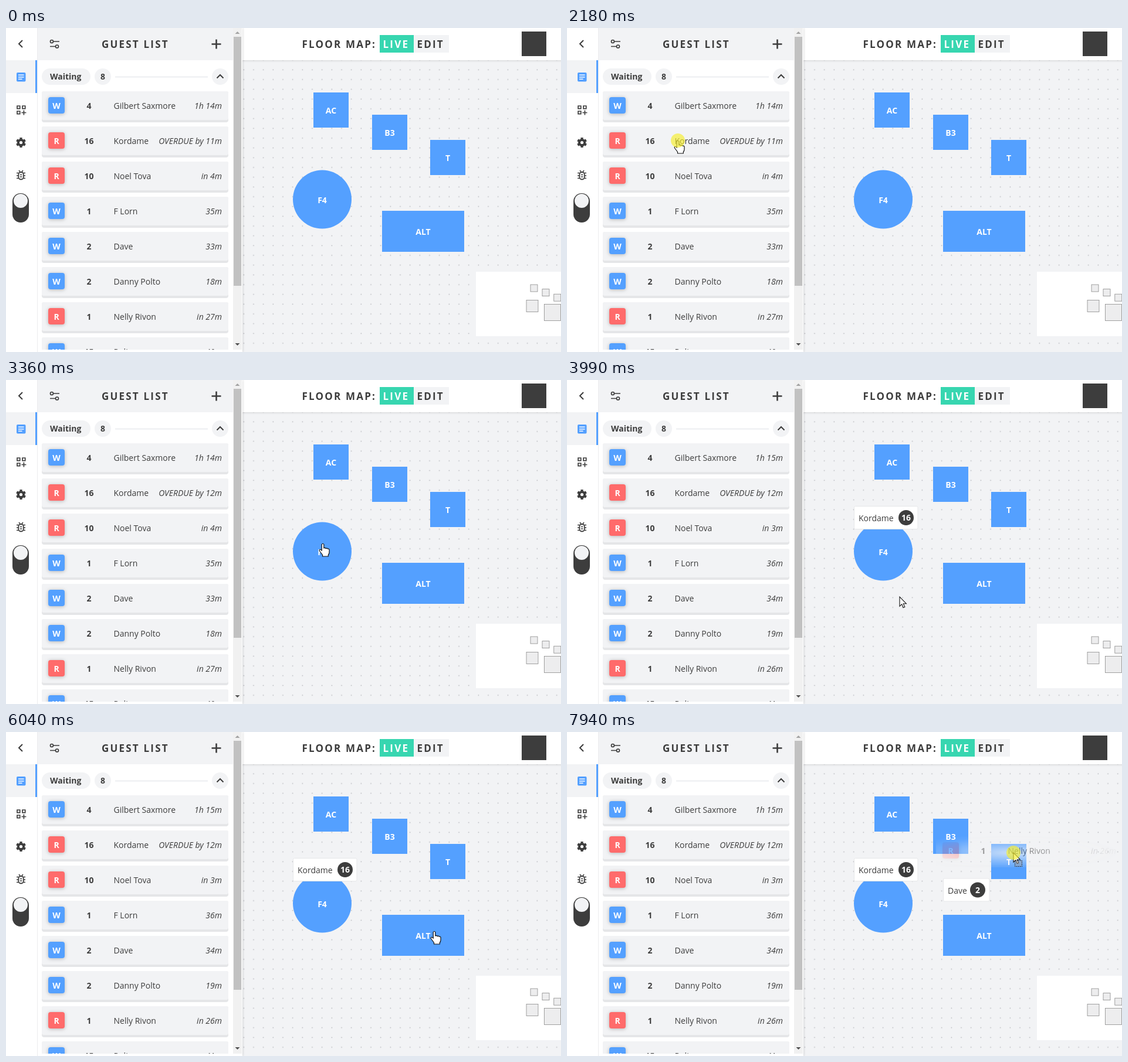
An HTML page for the animation above (8 s loop, 946 by 553 pixels).

```html
<!DOCTYPE html>
<html lang="en">
<head>
<meta charset="utf-8">
<title>Guest list</title>
<style>
  html, body { margin: 0; width: 100%; height: 100%; overflow: hidden; background: #fff; }
  svg { display: block; width: 946px; height: 553px; font: 14px "Open Sans", "Noto Sans", sans-serif; }
  text { fill: #3d3d3d; white-space: pre; }
  .b { font-weight: 700; }
  .i { font-style: italic; text-anchor: end; }
  .m { text-anchor: middle; }
  .w { fill: #fff; }
  .head { font-size: 17px; font-weight: 700; letter-spacing: 2.2px; }
  .line { fill: none; stroke: #3d3d3d; stroke-width: 2; }
  .thin { stroke-width: 1.7; }
  .badge { filter: drop-shadow(0 1px 3px rgba(0, 0, 0, .25)); }
  .shade { filter: drop-shadow(0 0 2px rgba(0, 0, 0, .2)); }
</style>
</head>
<body>
<svg viewBox="0 0 946 553">
  <defs>
    <pattern id="dots" x="397" y="63" width="16.67" height="16.67" patternUnits="userSpaceOnUse">
      <circle cx="8.3" cy="8.3" r=".85" fill="#b4b5ba"/>
    </pattern>
    <clipPath id="list"><rect x="54" y="55" width="333" height="494"/></clipPath>
  </defs>

  <!-- floor map -->
  <rect x="403" y="55" width="543" height="498" fill="#f2f3f5"/>
  <rect x="403" y="55" width="543" height="498" fill="url(#dots)"/>
  <g id="tables"></g>
  <rect x="801" y="416" width="145" height="110" fill="#fff"/>
  <g id="mini" fill="#ededee" stroke="#8a8a8a" stroke-width=".8"></g>
  <g id="seats"></g>
  <rect class="shade" x="402" width="550" height="55" fill="#fff"/>
  <text class="head" x="504.5" y="34">FLOOR MAP:</text>
  <rect x="637" y="12" width="58" height="30" fill="#37d6b0"/>
  <rect x="695" y="12" width="60" height="30" fill="#f2f3f5"/>
  <text class="head w" x="642.5" y="34">LIVE</text>
  <text class="head" x="700.5" y="34">EDIT</text>
  <rect x="879" y="6" width="42" height="42" fill="#3d3d3d"/>

  <!-- side bar -->
  <rect class="shade" width="403" height="553" fill="#fff"/>
  <rect x="53" width="1" height="553" fill="#ececee"/>
  <path class="line" d="M28 21l-6 6 6 6"/>
  <rect y="55" width="50" height="56" fill="#f2f3f5"/>
  <rect x="50" y="55" width="3" height="56" fill="#54a0ff"/>
  <rect x="18" y="76" width="15.5" height="15.5" rx="2" fill="#54a0ff"/>
  <path stroke="#fff" stroke-width="1.6" d="M21 80.3h9.500M21 83.800h9.500M21 87.300h6.500"/>
  <path class="line thin" d="M19 133h4.700v4.700H19zM28 133h4.700v4.700H28zM19 142h4.700v4.700H19zM30.400 140.500v8M26.400 144.500h8"/>
  <g fill="none" stroke="#3d3d3d">
    <circle cx="25.5" cy="195.5" r="4.6" stroke-width="4"/>
    <circle cx="25.5" cy="195.5" r="7" stroke-width="3" pathLength="12" stroke-dasharray="1.1 .9" stroke-dashoffset="1.55"/>
    <rect x="21.3" y="246" width="8.5" height="12.5" rx="4.2" stroke-width="1.8"/>
    <path stroke-width="1.6" d="M18 247.500h3.500M18 252h3M18 256.500h3.500M29.500 247.500H33M30 252h3M29.500 256.500H33M22 243l2 2.500M29 243l-2 2.500M23.800 250.500h3.500M23.800 254h3.500"/>
  </g>
  <rect x="11" y="282" width="28" height="50" rx="14" fill="#3d3d3d"/>
  <circle cx="25" cy="295" r="12" fill="#f2f3f5"/>

  <!-- guest list -->
  <rect x="54" width="333" height="55" fill="#f2f3f5"/>
  <path class="line thin" d="M80.500 23H91M75 31.500h9"/>
  <circle class="line thin" cx="78" cy="23" r="2.5"/>
  <circle class="line thin" cx="87" cy="31.5" r="2.5"/>
  <text class="head" x="163" y="34">GUEST LIST</text>
  <path stroke="#3d3d3d" stroke-width="2.6" d="M350.500 27.500h16M358.500 19.500v16"/>
  <g fill="#f2f3f5">
    <rect x="61" y="69" width="83" height="28" rx="14"/>
    <circle cx="165" cy="83" r="14"/>
    <rect x="186" y="82" width="158" height="3"/>
    <circle cx="365" cy="83" r="14"/>
  </g>
  <text class="b" x="75" y="88">Waiting</text>
  <text class="b m" x="165" y="88">8</text>
  <path class="line" d="M359.500 85.500l5.500-5.500 5.500 5.500"/>
  <g id="rows" clip-path="url(#list)"></g>
  <rect x="387" width="15" height="549" fill="#f1f1f1"/>
  <rect x="388" y="15" width="13" height="425" fill="#c1c1c1"/>
  <path fill="#a3a3a3" d="M390.500 10h8l-4-4z"/>
  <path fill="#505050" d="M390.500 538h8l-4 4z"/>

  <g id="ghosts"></g>
  <g id="cursor">
    <path id="hand" fill="#fff" stroke="#111" stroke-width="1.2" stroke-linejoin="round"
      d="M-1.800 1.500Q0-1 1.800 1.500V8q2-1.300 3.300.6 2-1 3.200.6 2.300-.7 2.700 1.500V15q0 2.500-1.700 4.500V22H-.5v-2.500L-5 13.500q-1.700-2.500.2-3.200 1.500-.4 3 2z"/>
    <path id="arrow" fill="#fff" stroke="#111" stroke-width="1.1" d="M0 0V16.200L3.700 12.700 6.200 18.500 8.800 17.400 6.300 11.700H11.300z"/>
    <rect id="carry" x="2.5" y="13.5" width="12" height="10" fill="#999" fill-opacity=".45" stroke="#111" stroke-dasharray="1.5"/>
    <circle id="press" r="12" fill="#f6ee2c" fill-opacity=".66"/>
  </g>
</svg>
<script>
const LOOP = 8000, STEP = 79;
const $ = id => document.getElementById(id);
const show = (el, on) => { el.style.display = on ? '' : 'none'; };

// W: minutes waited so far; R: minutes until the booking
const guests = [
  { kind: 'W', party: 4, name: 'Gilbert Saxmore', min: 74 },
  { kind: 'R', party: 16, name: 'Kordame', min: -11 },
  { kind: 'R', party: 10, name: 'Noel Tova', min: 4 },
  { kind: 'W', party: 1, name: 'F Lorn', min: 35 },
  { kind: 'W', party: 2, name: 'Dave', min: 33 },
  { kind: 'W', party: 2, name: 'Danny Polto', min: 18 },
  { kind: 'R', party: 1, name: 'Nelly Rivon', min: 27 },
  { kind: 'W', party: 15, name: 'Rolin', min: 40 }
];

const tables = [
  { name: 'AC', x: 524, y: 110, w: 60, h: 60 },
  { name: 'B3', x: 624, y: 148, w: 60, h: 60 },
  { name: 'T', x: 723, y: 191, w: 60, h: 60 },
  { name: 'F4', x: 489, y: 242.5, w: 100, h: 100, r: 50 },
  { name: 'ALT', x: 641, y: 312, w: 140, h: 70 }
];

const drags = [
  { row: 1, press: 2180, lift: 2255, drop: 3360, grab: [185, 188] },
  { row: 4, press: 4620, lift: 4860, drop: 6040, grab: [165, 374] },
  { row: 6, press: 7220, lift: 7295, drop: LOOP, grab: [193, 496] }
];

// each glide eases on from the last one; bow bends it down (or up)
const glides = [
  { from: 140, to: 380, x: 213, y: 267 },
  { from: 610, to: 1560, x: 189, y: 192, bow: -73 },
  { from: 2180, to: 2810, x: 568, y: 267 },
  { from: 2890, to: 3210, x: 540, y: 279 },
  { from: 3830, to: 3990, x: 567, y: 370 },
  { from: 3990, to: 4630, x: 165, y: 374, bow: 45 },
  { from: 4860, to: 5340, x: 730, y: 340, bow: 45 },
  { from: 6040, to: 6830, x: 223, y: 491 },
  { from: 6910, to: 7070, x: 193, y: 496 },
  { from: 7220, to: 7940, x: 761, y: 206 }
];

function pointer(t) {
  let x = 445, y = 552;
  for (const g of glides) {
    if (t < g.from) break;
    const held = Math.floor((t - g.from) / STEP) * STEP;
    const u = Math.min(1, held / (g.to - g.from - 10));
    const e = u * u * (3 - 2 * u);
    x += (g.x - x) * e;
    y += (g.y - y) * e + (g.bow || 0) * Math.sin(Math.PI * e);
  }
  return [x, y];
}

function clock({ kind, min }, t) {
  const ticked = t >= (min < 0 ? 2500 : 3600);
  const m = min + (kind === 'W' ? 1 : -1) * ticked;
  if (kind === 'R') return m < 0 ? `OVERDUE by ${-m}m` : `in ${m}m`;
  return m < 60 ? `${m}m` : `${Math.floor(m / 60)}h ${m % 60}m`;
}

const label = (x, y, s, cls = '') => `<text class="${cls}" x="${x}" y="${y}">${s}</text>`;
const box = (x, y, w, h, more = '') => `<rect x="${x}" y="${y}" width="${w}" height="${h}" ${more}/>`;

function card(g, i, t) {
  const y = 108 + 60 * i;
  return box(61, y, 318, 53, 'rx="4" fill="#e5e6e8"') +
    box(61, y, 318, 49, 'rx="3" fill="#f2f3f5"') +
    box(72, y + 10, 28, 28, `class="badge" rx="4" fill="${g.kind === 'W' ? '#54a0ff' : '#ff6b6b'}"`) +
    label(86, y + 30, g.kind, 'b m w') + label(141.5, y + 30, g.party, 'b m') +
    label(183.5, y + 30, g.name) + label(368, y + 30, clock(g, t), 'i time');
}

function seat(x, y, w, { party, name }) {
  const cx = x + w - 20.5;
  return '<g>' + box(x + .5, y + .5, w - 1, 39, 'rx="2" fill="#fff" stroke="#e6e7e9"') +
    `<circle cx="${cx}" cy="${y + 20}" r="13" fill="#3d3d3d"/>` +
    label(x + 8, y + 26, name) + label(cx, y + 25, party, 'b m w') + '</g>';
}

// a card seen through a flat oval that fades out from the grab point
function ghost({ row, lift, grab: [x, y] }, n) {
  const stops = [.75, .56, .38, .22, .08, 0]
    .map((a, i) => `<stop offset="${i / 5}" stop-color="#fff" stop-opacity="${a}"/>`).join('');
  const area = 'x="55" y="100" width="330" height="453"';
  return `<g><radialGradient id="fade${n}" gradientUnits="userSpaceOnUse" cx="0" cy="0" r="1"
      gradientTransform="translate(${x} ${y}) scale(195 32)">${stops}</radialGradient>
    <mask id="mask${n}" maskUnits="userSpaceOnUse" ${area}><rect ${area} fill="url(#fade${n})"/></mask>
    <g mask="url(#mask${n})">${card(guests[row], row, lift)}</g></g>`;
}

const each = (list, f) => list.map(f).join('');
$('tables').innerHTML = each(tables, ({ name, x, y, w, h, r = 0 }) =>
  box(x, y, w, h, `rx="${r}" fill="#54a0ff"`) +
  label(x + w / 2, Math.round(y + h / 2) + 6, name, 'b m w'));
$('mini').innerHTML = each(tables, ({ x, y, w, h }) =>
  box(789.2 + x / 5, 416 + (y - (w - h) / 2) / 5, w / 5, w / 5));
$('rows').innerHTML = each(guests, (g, i) => card(g, i, 0));
$('seats').innerHTML = seat(489, 215, 109.5, guests[1]) + seat(641, 249.5, 79.5, guests[4]);
$('ghosts').innerHTML = each(drags, ghost);

const times = [...$('rows').querySelectorAll('.time')];
const ghosts = [...$('ghosts').children];
const seats = [...$('seats').children];

const clickable = (px, py) => px < 380 ||
  tables.some(({ x, y, w, h }) => px >= x && px <= x + w && py >= y && py <= y + h);

function draw(t) {
  guests.forEach((g, i) => {
    const s = clock(g, t);
    if (times[i].textContent !== s) times[i].textContent = s;
  });
  show(seats[0], t >= 3440);
  show(seats[1], t >= 6119);

  const [x, y] = pointer(t);
  const held = drags.find(d => t >= d.press && t < d.drop);
  const carried = held && t >= held.lift;
  drags.forEach((d, i) => {
    show(ghosts[i], carried && d === held);
    ghosts[i].setAttribute('transform', `translate(${x - d.grab[0]} ${y - d.grab[1]})`);
  });
  const hand = !carried && clickable(x, y);
  show($('cursor'), t >= glides[0].from);
  $('cursor').setAttribute('transform', `translate(${x} ${y})`);
  show($('hand'), hand);
  show($('arrow'), !hand);
  show($('carry'), carried);
  show($('press'), held);
}

const start = performance.now();
function tick() {
  draw((performance.now() - start) % LOOP);
  requestAnimationFrame(tick);
}
tick();
</script>
</body>
</html>
```
